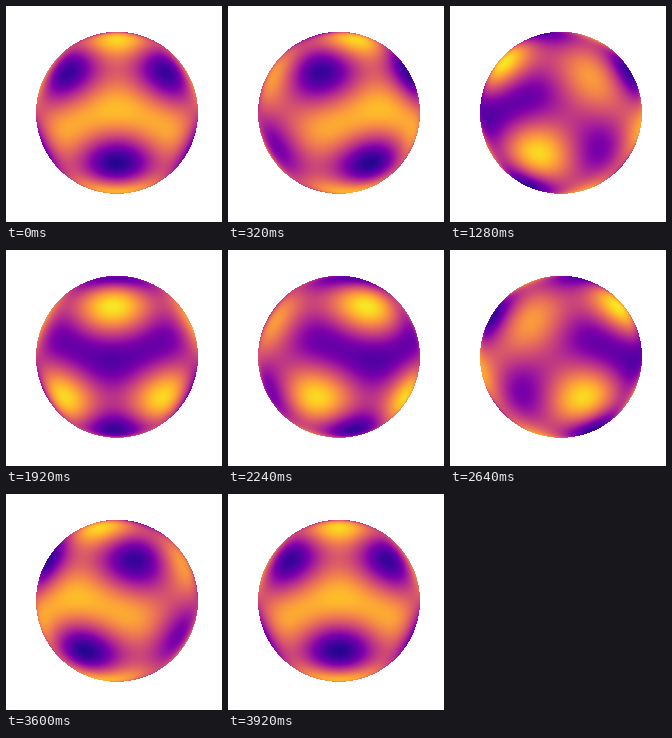
Animation of 216x216 px, one loop 4 s. Source, as a matplotlib script:

```python
import numpy as np
import matplotlib.pyplot as plt
from matplotlib.animation import FuncAnimation

SIZE = 216
CX, CY, RADIUS = 111.0, 106.8, 81.0
FRAMES, INTERVAL = 50, 80
LIMIT = 0.95

# Orthographic view of a unit sphere, one sample per pixel
cols, rows = np.meshgrid(np.arange(SIZE) + 0.5, np.arange(SIZE) + 0.5)
x = (cols - CX) / RADIUS
s = (CY - rows) / RADIUS
inside = x**2 + s**2 <= 1
x, s = np.where(inside, x, np.nan), np.where(inside, s, np.nan)
c = np.sqrt(1 - s**2)
lon = np.arctan2(x, np.sqrt(np.clip(1 - x**2 - s**2, 0, None)))

# Latitude profile of each zonal order; s = sin(lat), c = cos(lat)
profiles = {
    0: -0.25 * (63 * s**5 - 70 * s**3 + 15 * s) / 8,
    1: c * (0.40 * (21 * s**4 - 14 * s**2 + 1) + 0.07 - 0.08 * (5 * s**2 - 1)),
    2: c**2 * (0.75 * (3 * s**3 - s) + 0.12 * s),
    3: 0.12 * c**3,
    4: 1.66 * s * c**4,
}


def field(turn):
    return sum(p * np.cos(m * (lon - turn)) for m, p in profiles.items())


fig = plt.figure(figsize=(SIZE / 100, SIZE / 100), dpi=100, facecolor="white")
ax = fig.add_axes([0, 0, 1, 1])
ax.axis("off")
globe = ax.imshow(field(0), cmap="plasma", vmin=-LIMIT, vmax=LIMIT,
                  interpolation="nearest", aspect="auto")


def update(i):
    # First and last frames coincide
    globe.set_data(field(2 * np.pi * i / (FRAMES - 1)))
    return (globe,)


anim = FuncAnimation(fig, update, frames=FRAMES, interval=INTERVAL,
                     repeat=True, repeat_delay=0)
plt.show()
```
